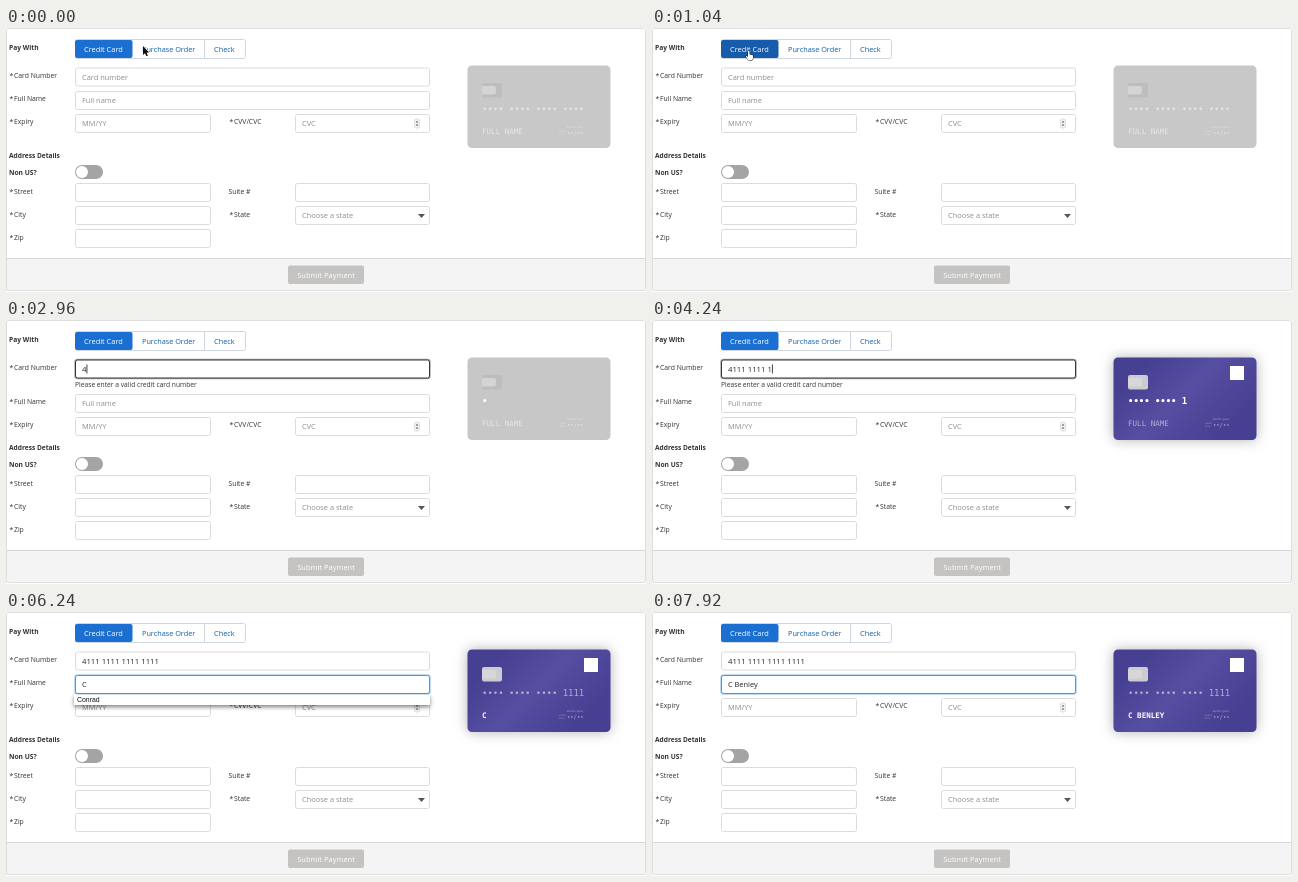
Write an HTML page with a canvas that moves like this. It is 640 by 264 pixels and loops after 8 s.

```html
<!DOCTYPE html>
<html lang="en">
<head>
<meta charset="utf-8">
<title>Payment form</title>
<style>
  html, body { margin: 0; width: 100%; height: 100%; overflow: hidden; background: #fff; }
  canvas { display: block; width: 640px; height: 264px; }
</style>
</head>
<body>
<canvas id="stage" width="640" height="264"></canvas>
<script>
const ctx = document.getElementById('stage').getContext('2d');
const LOOP = 8000;
const UI = '"Open Sans", "Noto Sans", sans-serif';
const MONO = '"DejaVu Sans Mono", monospace';

const NUMBER = '4111111111111111';
const NAME = 'C Benley';
const SUGGESTION = 'Conrad';

// Moments of the story, in ms
const FOCUS_NUMBER = 1960, TYPE_NUMBER = 2860, DIGIT_GAP = 158;
const VALID = TYPE_NUMBER + 15 * DIGIT_GAP;
const FOCUS_NAME = 5560, TYPE_NAME = 5700, TYPE_REST = 6560, LETTER_GAP = 140;
const CARD_TINT = 2940;

const clamp = v => Math.max(0, Math.min(1, v));
const ease = v => { v = clamp(v); return v * v * (3 - 2 * v); };
const ramp = (t, start, length) => ease((t - start) / length);
const mix = (a, b, k) => `rgb(${a.map((v, i) => Math.round(v + (b[i] - v) * k))})`;

function box(x, y, w, h, r, fill, stroke, lineWidth = 1) {
  ctx.beginPath();
  ctx.roundRect(x, y, w, h, r);
  if (fill) { ctx.fillStyle = fill; ctx.fill(); }
  if (stroke) { ctx.strokeStyle = stroke; ctx.lineWidth = lineWidth; ctx.stroke(); }
}

// y is the middle of the line
function text(str, x, y, size, color, { weight = 500, family = UI, align = 'left' } = {}) {
  ctx.font = `${weight} ${size}px ${family}`;
  ctx.textAlign = align;
  ctx.fillStyle = color;
  ctx.fillText(str, x, y + size * 0.36);
  return ctx.measureText(str).width;
}

function line(x1, y1, x2, y2, color, width = 1) {
  ctx.strokeStyle = color;
  ctx.lineWidth = width;
  ctx.beginPath();
  ctx.moveTo(x1, y1);
  ctx.lineTo(x2, y2);
  ctx.stroke();
}

function poly(points, fill, stroke) {
  ctx.beginPath();
  points.forEach(([x, y]) => ctx.lineTo(x, y));
  ctx.closePath();
  if (stroke) { ctx.strokeStyle = stroke; ctx.lineWidth = 1; ctx.stroke(); }
  ctx.fillStyle = fill;
  ctx.fill();
}

function label(str, x, y, required = true) {
  if (required) text('*', x, y, 6.8, '#333');
  text(str, required ? x + 4.5 : x, y, 6.8, '#333');
}

const RINGS = {
  '': { border: '#dddbda' },
  error: { border: '#34353f', glow: '#a5a7ad' },
  ok: { border: '#4a9ccc', glow: '#a4d0ee' }
};

function field(x, y, w, { value = '', hint = '', focus = '', size = 7.4, caret = false } = {}) {
  const { border, glow } = RINGS[focus];
  if (glow) box(x, y, w, 19, 2.5, null, glow, 1.4);
  box(x + .5, y + .5, w - 1, 18, 2, '#fff', border);
  const mid = y + 9.5;
  let width = 0;
  if (value) width = text(value, x + 7, mid, size, '#222');
  else if (hint) text(hint, x + 7, mid, 7.45, '#8f8d8c', { weight: 400 });
  if (caret) line(x + 7.5 + width, mid - 4.5, x + 7.5 + width, mid + 4.5, '#111', .8);
}

function typedNumber(t) {
  if (t < TYPE_NUMBER) return '';
  return NUMBER.slice(0, 1 + Math.floor((t - TYPE_NUMBER) / DIGIT_GAP));
}

function typedName(t) {
  if (t < TYPE_NAME) return '';
  if (t < TYPE_REST) return NAME[0];
  return NAME.slice(0, 2 + Math.floor((t - TYPE_REST) / LETTER_GAP));
}

const group = str => str.replace(/(.{4})(?!$)/g, '$1 ');

// Past the first group, only the newest group is readable
function mask(digits) {
  const n = digits.length;
  const hidden = Math.floor((n - 1) / 4) * 4 || n;
  return n ? '•'.repeat(hidden) + digits.slice(hidden) : '•'.repeat(16);
}

const blink = (t, since) => t >= since && Math.floor((t - since) / 500) % 2 === 0;

function lastKey(t) {
  if (t < TYPE_NUMBER) return FOCUS_NUMBER;
  if (t < FOCUS_NAME)
    return TYPE_NUMBER + DIGIT_GAP * Math.min(15, Math.floor((t - TYPE_NUMBER) / DIGIT_GAP));
  if (t < TYPE_NAME) return FOCUS_NAME;
  if (t < TYPE_REST) return TYPE_NAME;
  return TYPE_REST + LETTER_GAP * Math.min(6, Math.floor((t - TYPE_REST) / LETTER_GAP));
}

function pointer(t) {
  const stops = [[0, 137, 18], [80, 137, 18], [240, 158, 20], [720, 158, 20], [1000, 97, 23],
                 [1240, 97, 23], [1600, 128, 48], [8000, 128, 48]];
  const i = stops.findIndex((s, n) => n && t < s[0]);
  const [t0, x0, y0] = stops[i - 1], [t1, x1, y1] = stops[i];
  const k = ease((t - t0) / (t1 - t0));
  return { x: x0 + (x1 - x0) * k, y: y0 + (y1 - y0) * k };
}

function drawPointer(t, { x, y }) {
  if (t >= TYPE_NUMBER) return;
  ctx.save();
  ctx.translate(x, y);
  if (y > 39) {
    line(0, -4, 0, 4, '#333', .8);
    line(-1.5, -4.3, 1.5, -4.3, '#333', .8);
    line(-1.5, 4.3, 1.5, 4.3, '#333', .8);
  } else if (t < 120 || y > 32) {
    poly([[0, 0], [0, 9], [2, 7.2], [3.4, 10.3], [4.9, 9.6], [3.6, 6.7], [6, 6.5]], '#111', '#fff');
  } else {
    poly([[-1, 0], [.4, 0], [.6, 3.5], [3.8, 4.3], [4.2, 6], [3.4, 9], [-.8, 9],
          [-3.2, 5.6], [-2.6, 4.8], [-1, 6]], '#fff', '#111');
  }
  ctx.restore();
}

function drawTabs(mouse) {
  const hover = mouse.x > 69 && mouse.x < 127 && mouse.y > 12 && mouse.y < 31;
  text('Pay With', 3, 19.4, 6.7, '#333', { weight: 700 });
  box(69.5, 11.5, 170, 19, 2, '#fff', '#d0d6e0');
  line(198.5, 12, 198.5, 30, '#d0d6e0');
  box(69, 12, 57.5, 18, 2, hover ? '#165cab' : '#1b6fd0');
  text('Credit Card', 78, 21.4, 7.4, '#fff');
  text('Purchase Order', 136, 21.4, 7.3, '#0b5fae');
  text('Check', 208, 21.4, 7.4, '#0b5fae');
}

function drawForm(t) {
  const onNumber = t >= FOCUS_NUMBER && t < FOCUS_NAME;
  const onName = t >= FOCUS_NAME;
  const invalid = t >= TYPE_NUMBER && t < VALID;
  const shift = invalid ? 11 : 0;
  const caret = blink(t, lastKey(t));

  label('Card Number', 3.5, 47.5);
  label('Full Name', 3.5, 70.5 + shift);
  label('Expiry', 3.5, 93.5 + shift);
  label('CVV/CVC', 223.5, 93.5 + shift);

  field(69, 63 + shift, 355, {
    value: typedName(t), hint: 'Full name', focus: onName ? 'ok' : '', caret: onName && caret
  });
  field(69, 39.5, 355, {
    value: group(typedNumber(t)), hint: 'Card number', size: 7.75,
    focus: onNumber ? (invalid ? 'error' : 'ok') : '', caret: onNumber && caret
  });
  if (invalid) text('Please enter a valid credit card number', 69, 64.7, 6.7, '#333');

  const y = 86 + shift;
  field(69, y, 136, { hint: 'MM/YY' });
  field(289, y, 135, { hint: 'CVC' });
  box(408.5, y + 5, 5, 9, 2, '#f6f6f6', '#d0d0d0', .7);
  poly([[409.7, y + 8.5], [411, y + 6.7], [412.3, y + 8.5]], '#555');
  poly([[409.7, y + 10.5], [411, y + 12.3], [412.3, y + 10.5]], '#555');

  text('Address Details', 3, 127.5, 6.6, '#333', { weight: 700 });
  text('Non US?', 3, 144.7, 6.7, '#333', { weight: 700 });
  box(69, 137, 28, 14, 7, '#a5a3a4');
  box(70, 138, 12, 12, 6, '#fff');

  label('Street', 3.5, 163.5);
  label('Suite #', 222.5, 163.5, false);
  label('City', 3.5, 186.5);
  label('State', 223.5, 186.5);
  label('Zip', 3.5, 209.5);
  field(69, 155, 136);
  field(289, 155, 135);
  field(69, 178, 136);
  field(289, 178, 135, { hint: 'Choose a state' });
  poly([[412, 186], [419, 186], [415.5, 190]], '#555');
  field(69, 201, 136);

  if (t >= TYPE_NAME && t < TYPE_REST) {
    ctx.save();
    ctx.shadowColor = 'rgba(0,0,0,.5)';
    ctx.shadowBlur = 4;
    ctx.shadowOffsetY = 2;
    box(68, 82.5, 356, 10.5, 0, '#fff');
    ctx.restore();
    text(SUGGESTION, 71, 87.7, 6.9, '#111', { family: '"Liberation Sans", Arial, sans-serif' });
  }
}

function drawCard(t) {
  const tint = ramp(t, CARD_TINT, 400);
  const numberLight = ramp(t, FOCUS_NUMBER, 300) * (1 - ramp(t, FOCUS_NAME, 300));
  const nameLight = ramp(t, FOCUS_NAME, 300);
  const white = glow => `rgba(255,255,255,${.55 + .45 * glow})`;
  const mono = (str, x, y, size, glow) =>
    text(str, x, y, size, white(glow), { family: MONO, weight: glow > .5 ? 700 : 400 });

  // A soft diagonal sheen runs from the lower left to the upper right
  const edge = mix([200, 200, 200], [71, 63, 145], tint);
  const sheen = ctx.createLinearGradient(496, 42, 570, 116);
  sheen.addColorStop(0, edge);
  sheen.addColorStop(.45, mix([200, 200, 200], [86, 78, 160], tint));
  sheen.addColorStop(1, edge);
  ctx.save();
  ctx.shadowColor = `rgba(0,0,0,${.3 * tint})`;
  ctx.shadowBlur = 13;
  box(461.5, 37.5, 143, 82.5, 4.5, sheen);
  ctx.restore();

  box(476, 55, 20, 14.5, 2, mix([189, 189, 189], [204, 203, 207], tint));
  box(476, 58, 14, 8.5, [0, 2, 2, 0], mix([212, 212, 212], [215, 214, 217], tint));
  box(578, 46, 14, 14, 0, `rgba(255,255,255,${tint})`);

  mono(group(mask(typedNumber(t))), 476, 80.5, 8.95, numberLight);
  mono(typedName(t).toUpperCase() || 'FULL NAME', 476, 103, 7.55, nameLight);

  mono('month/year', 561, 99.5, 2.7, 0);
  mono('valid', 553, 103, 2.2, 0);
  mono('thru', 553, 106, 2.2, 0);
  mono('••/••', 561, 104.6, 5.5, 0);
}

function drawFrame() {
  box(0, 230, 640, 33, 0, '#f4f4f4');
  line(0, 230.5, 640, 230.5, '#d9d8d8');
  box(.5, .5, 639, 262, 2, null, '#dedede');
  box(282, 237.5, 76, 18.5, 2, '#c4c3c2');
  text('Submit Payment', 320, 247, 7.5, '#fff', { align: 'center' });
}

function render(t) {
  ctx.fillStyle = '#fff';
  ctx.fillRect(0, 0, 640, 264);
  const mouse = pointer(t);
  drawFrame();
  drawTabs(mouse);
  drawForm(t);
  drawCard(t);
  drawPointer(t, mouse);
}

const start = performance.now();
function tick() {
  render((performance.now() - start) % LOOP);
  requestAnimationFrame(tick);
}
tick();
</script>
</body>
</html>
```
